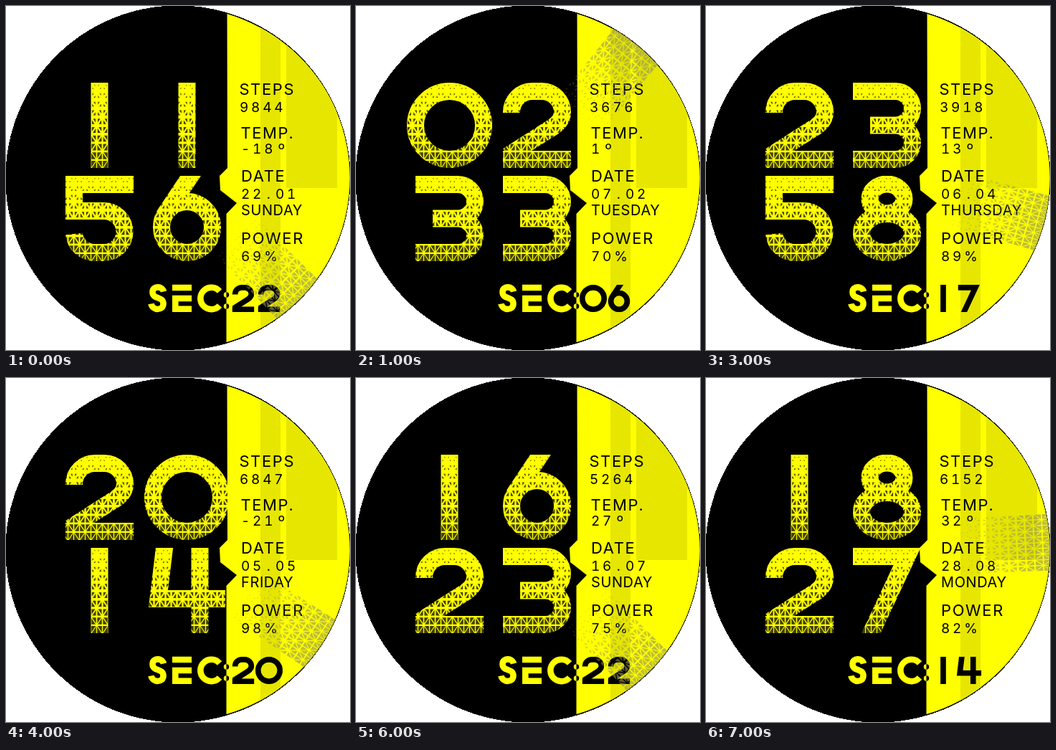
These frames come from a looping animation (480x480 px, 8 s). An HTML page:

```html
<!DOCTYPE html>
<html lang="en">
<head>
<meta charset="utf-8">
<title>Watch face</title>
<style>
  html, body { margin: 0; width: 100%; height: 100%; overflow: hidden; background: #fff; }
  svg { display: block; width: 100vw; height: 100vh; }
  text { font-family: Inter, Roboto, sans-serif; font-weight: 400; fill: #000; white-space: pre; }
  .label { font-size: 22px; letter-spacing: 1.6px; }
  .value { font-size: 19px; letter-spacing: 3.8px; word-spacing: -5.5px; font-variant-numeric: tabular-nums; }
  .day { font-size: 20px; letter-spacing: .6px; }
  .stroke { fill: none; stroke-width: 24; stroke-miterlimit: 4; }
  .mesh { fill-opacity: .75; }
</style>
</head>
<body>
<svg viewBox="0 0 480 480">
  <defs>
    <clipPath id="face"><circle cx="240" cy="240" r="240.7"/></clipPath>
    <clipPath id="disc"><circle cx="241" cy="240" r="238.8"/></clipPath>
    <clipPath id="side"><path d="M308.500 0L309 226L298 237L299 257L322 275L307.500 290V480H480V0Z"/></clipPath>
    <clipPath id="row"><rect x="-62" width="300" height="119"/></clipPath>
    <clipPath id="beam"><rect x="-40" y="-242" width="80" height="126"/></clipPath>
    <linearGradient id="fade" gradientUnits="userSpaceOnUse" x1="0" y1="-120" x2="0" y2="-215">
      <stop offset="0" stop-color="#96965a" stop-opacity=".25"/>
      <stop offset="1" stop-color="#96965a" stop-opacity=".62"/>
    </linearGradient>
  </defs>

  <circle cx="240" cy="240" r="240.7" shape-rendering="crispEdges"/>

  <g transform="translate(130.5 107)">
    <g id="hours" class="stroke" stroke="#ff0" clip-path="url(#row)"></g>
    <path class="mesh"/>
  </g>
  <g transform="translate(130.5 237)">
    <g id="minutes" class="stroke" stroke="#ff0" clip-path="url(#row)"></g>
    <path class="mesh"/>
  </g>

  <g fill="none" stroke="#ff0" stroke-width="8.6">
    <path d="M220 398.500C218 390 204.500 390.500 204.500 399C204.500 410 219.500 404.500 219.500 415.500C219.500 425.500 204.500 425.500 202.500 415.500"/>
    <path d="M232 393H259M259 408H236.300V422.700H259"/>
    <path d="M298 398A15.2 15.2 0 1 0 298 418"/>
  </g>
  <path id="colon" d="M307.500 403h0M307.500 419h0" stroke="#ff0" stroke-width="7.5" stroke-linecap="round"/>

  <g clip-path="url(#disc)"><g clip-path="url(#side)">
    <rect width="480" height="480" fill="#ff0"/>
    <path d="M355 0H383V480H355ZM391 0H462V254H391Z" fill="#e6e600"/>
    <use href="#colon" style="filter:brightness(0)"/>
  </g></g>

  <g transform="translate(331 389) scale(.32)">
    <g id="seconds" class="stroke" stroke="#000" clip-path="url(#row)"></g>
  </g>

  <text class="label" x="325.500" y="124">STEPS</text>
  <text class="value" x="326" y="148" id="steps"></text>
  <text class="label" x="327.500" y="185">TEMP.</text>
  <text class="value" x="328" y="206" id="temp"></text>
  <text class="label" x="328" y="245">DATE</text>
  <text class="value" x="328" y="269" id="date"></text>
  <text class="day" x="328" y="292" id="day"></text>
  <text class="label" x="328" y="332">POWER</text>
  <text class="value" x="328" y="356" id="power"></text>

  <g clip-path="url(#face)">
    <g id="hand"><path id="grid" fill="url(#fade)" clip-path="url(#beam)"/></g>
  </g>
</svg>

<script>
const $ = id => document.getElementById(id);

// Digit centre lines, 119 units tall, centred on x = 0
const DIGITS = [
  'M-47.5 59.5A47.5 47.5 0 1 1 47.5 59.5A47.5 47.5 0 1 1 -47.5 59.5Z',
  'M0 0V119',
  'M-35.5 42V41A29 29 0 0 1 -6.5 12H6.5A29 29 0 0 1 35.5 41Q35.5 53 22 62L-40.800 102M-47.5 107H47.5',
  'M-47.5 12H11.7A23.75 23.75 0 0 1 11.7 59.5H-23.5M11.7 59.5A23.75 23.75 0 0 1 11.7 107H-47.5',
  'M-31 -4L-40 71H53.500M18 0V119',
  'M47.5 12H-35.5V49H6A29 29 0 0 1 6 107H-6A29 29 0 0 1 -35.5 81',
  'M11.7 -10L-29.6 51.8M-35.5 71.5A35.5 35.5 0 1 1 35.5 71.5A35.5 35.5 0 1 1 -35.5 71.5Z',
  'M-47.5 12H28L-25 125',
  'M-24 32A24 20.500 0 1 1 24 32A24 20.500 0 1 1 -24 32ZM-35.5 80A35.5 27 0 1 1 35.5 80A35.5 27 0 1 1 -35.5 80Z'
];

// [time, seconds, steps, temperature, date, day, power]
const STATES = [
  ['1156', '22', '9844', '-18', '22 . 01', 'SUNDAY', 69],
  ['0233', '06', '3676', '1', '07 . 02', 'TUESDAY', 70],
  ['0815', '00', '7325', '8', '08 . 03', 'WEDNESDAY', 76],
  ['2358', '17', '3918', '13', '06 . 04', 'THURSDAY', 89],
  ['2014', '20', '6847', '-21', '05 . 05', 'FRIDAY', 98],
  ['2323', '34', '10490', '-5', '17 . 06', 'SATURDAY', 84],
  ['1623', '22', '5264', '27', '16 . 07', 'SUNDAY', 75],
  ['1827', '14', '6152', '32', '28 . 08', 'MONDAY', 82]
];

// Cells cut by a diagonal into two right triangles, each shrunk about its centroid
function mesh(left, top, width, height, scale) {
  const w = 8, h = 12;
  let d = '';
  for (let row = 0; row * h < height; row++) {
    for (let col = 0; col * w < width; col++) {
      const lean = (row + col) % 2 ? 1 : -1;
      for (const side of [-1, 1]) {
        const x = left + (col + 0.5) * w + side * lean * w / 6;
        const y = top + (row + 0.5) * h + side * h / 6;
        const s = scale((y - top) / height) * side;
        const dx = s * lean * w, dy = s * h;
        d += `M${(x + dx / 3).toFixed(2)} ${(y + dy / 3).toFixed(2)}h${(-dx).toFixed(2)}l${dx.toFixed(2)} ${(-dy).toFixed(2)}Z`;
      }
    }
  }
  return d;
}

function setDigits(id, text, pitch) {
  $(id).innerHTML = [...text]
    .map((c, i) => `<path d="${DIGITS[c]}" transform="translate(${i * pitch})"/>`).join('');
}

function show([time, sec, steps, temp, date, day, power]) {
  setDigits('hours', time.slice(0, 2), 122);
  setDigits('minutes', time.slice(2), 122);
  setDigits('seconds', sec, 112.5);
  $('steps').textContent = steps;
  $('temp').textContent = temp + ' º';
  $('date').textContent = date;
  $('day').textContent = day;
  $('power').textContent = power + '%';
  $('hand').setAttribute('transform', `translate(240 240) rotate(${sec * 6 + 3.4})`);
}

const grain = mesh(-60, 0, 242, 119, k => 0.15 + 0.65 * k);
document.querySelectorAll('.mesh').forEach(p => p.setAttribute('d', grain));
$('grid').setAttribute('d', mesh(-40, -242, 80, 126, k => 0.85 - 0.65 * k));

const start = performance.now();
let shown = -1;
function tick() {
  const i = Math.floor((performance.now() - start) / 1000) % STATES.length;
  if (i !== shown) show(STATES[shown = i]);
  requestAnimationFrame(tick);
}
tick();
</script>
</body>
</html>
```
